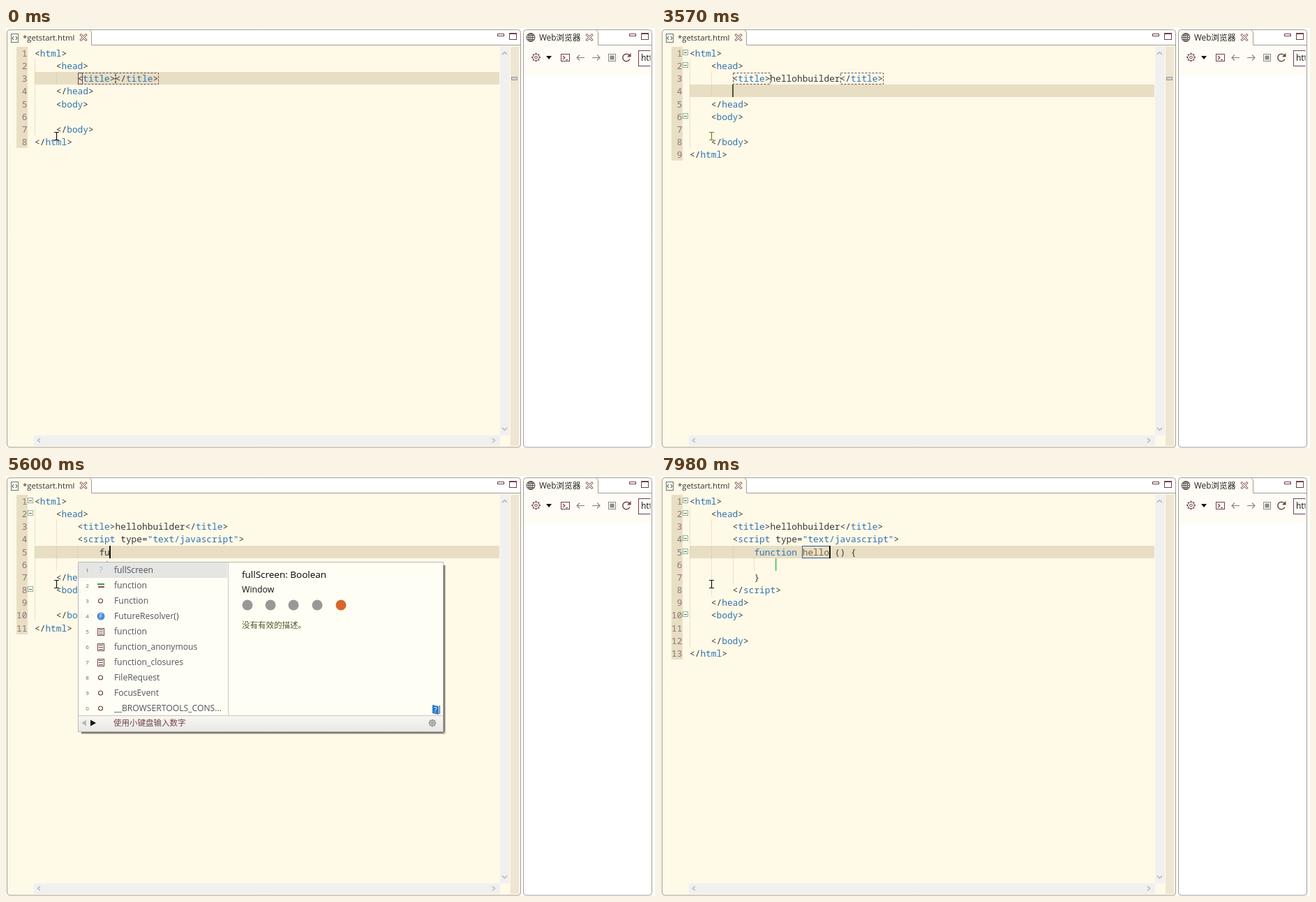
Write an HTML page with a canvas that moves like this. It is 930 px wide and 602 px high and loops after 8000 ms.

```html
<!DOCTYPE html>
<html lang="zh-CN">
<head>
<meta charset="utf-8">
<style>
html, body { margin: 0; width: 100%; height: 100%; overflow: hidden; background: #fff; }
canvas { display: block; }
</style>
</head>
<body>
<canvas width="930" height="602"></canvas>
<script>
const c = document.querySelector('canvas').getContext('2d');
const MONO = '12.83px "Noto Sans Mono", monospace';
const ui = size => `${size}px "Open Sans", "Noto Sans CJK SC", sans-serif`;
const CREAM = '#fff9e7', BAND = '#e8dec4', MAROON = '#6d4049', BLUE = '#2f74b3', DARK = '#33393a';
const LOOP = 8000, PITCH = 7.7, ROW = 18.15, BLINK = 490;

const colX = col => 41 + col * PITCH;
const rowY = row => Math.round(27 + row * ROW);

// drawing helpers
function fill(x, y, w, h, color) { c.fillStyle = color; c.fillRect(x, y, w, h); }
function box(x, y, w, h, color, dash = []) {
  c.strokeStyle = color; c.lineWidth = 1; c.setLineDash(dash);
  c.strokeRect(x + .5, y + .5, w, h);
  c.setLineDash([]);
}
function line(color, width, ...pts) {
  c.strokeStyle = color; c.lineWidth = width;
  c.beginPath();
  for (let i = 0; i < pts.length; i += 2) c.lineTo(pts[i], pts[i + 1]);
  c.stroke();
}
function poly(color, ...pts) {
  c.fillStyle = color;
  c.beginPath();
  for (let i = 0; i < pts.length; i += 2) c.lineTo(pts[i], pts[i + 1]);
  c.fill();
}
function disc(x, y, r, color) { c.fillStyle = color; c.beginPath(); c.arc(x, y, r, 0, 7); c.fill(); }
function ring(x, y, r, color, from = 0, to = 7, width = 1.2) {
  c.strokeStyle = color; c.lineWidth = width;
  c.beginPath(); c.arc(x, y, r, from, to); c.stroke();
}
function text(s, x, y, font, color, align = 'left') {
  c.font = font; c.fillStyle = color; c.textAlign = align;
  c.fillText(s, x, y);
}
function gear(x, y, r, color, width = 1) {
  ring(x, y, r * .72, color, 0, 7, width);
  ring(x, y, r * .28, color, 0, 7, width);
  for (let a = 0; a < 8; a++) {
    const dx = Math.cos(a * Math.PI / 4), dy = Math.sin(a * Math.PI / 4);
    line(color, 1.4, x + dx * r * .72, y + dy * r * .72, x + dx * r, y + dy * r);
  }
}
function closeIcon(x, y) {
  line(MAROON, 3, x - 4.5, y - 4.5, x + 4.5, y + 4.5);
  line(MAROON, 3, x - 4.5, y + 4.5, x + 4.5, y - 4.5);
  line('#fff', 1.5, x - 4, y - 4, x + 4, y + 4);
  line('#fff', 1.5, x - 4, y + 4, x + 4, y - 4);
}
function windowIcons(x) {
  box(x, 8, 9, 3, MAROON);
  box(x + 17, 7, 10, 9, MAROON);
  line(MAROON, 1, x + 17, 8.5, x + 28, 8.5);
}

// window frames
function panel(x, w, tabRight) {
  c.strokeStyle = '#a39c94'; c.lineWidth = 1;
  c.beginPath(); c.roundRect(x + .5, 2.5, w, 598.5, 4); c.stroke();
  line('#a39c94', 1, tabRight - 2, 3, tabRight + .5, 6, tabRight + .5, 24.5, x + w, 24.5);
}
function editorFrame(marker) {
  fill(2, 3, 120, 22, CREAM);
  fill(2, 25, 735, 576, CREAM);
  panel(1, 736, 122);
  box(7, 8, 10, 12, '#6c7478');
  line('#2f6075', 1.1, 11, 12, 9, 14.5, 11, 17);
  line('#2f6075', 1.1, 14, 12, 16, 14.5, 14, 17);
  text('*getstart.html', 24, 18, ui(11.3), '#333');
  closeIcon(111, 13.5);
  windowIcons(704);
  fill(708, 27, 14, 557, '#f0f0f0');
  fill(723, 27, 12, 572, '#eee6d3');
  fill(40, 584, 668, 15, '#f0f0f0');
  const grey = '#b5b5b5';
  line(grey, 1.5, 711, 38, 714.5, 34.5, 718, 38);
  line(grey, 1.5, 711, 573, 714.5, 576.5, 718, 573);
  line(grey, 1.5, 49, 588, 45.5, 591, 49, 594);
  line(grey, 1.5, 697, 588, 700.5, 591, 697, 594);
  if (marker) { fill(724, 70, 9, 5, '#d0d0ce'); box(724, 70, 8, 4, '#999'); }
}
function browserFrame() {
  fill(742, 25, 183, 43, '#fffcf5');
  fill(742, 3, 107, 22, '#fffcf5');
  panel(741, 184, 848);
  const ink = '#5c5558', grey = '#8d8888';
  ring(752, 13.5, 5.8, ink);
  c.beginPath(); c.ellipse(752, 13.5, 2.7, 5.8, 0, 0, 7); c.stroke();
  for (const dy of [-3, 0, 3]) line(ink, 1, 747, 13.5 + dy, 757, 13.5 + dy);
  line(ink, 1, 752, 8, 752, 19);
  text('Web浏览器', 764, 18, ui(11.7), '#222');
  closeIcon(836, 13.5);
  windowIcons(893);
  gear(759.5, 42, 6.5, MAROON);
  poly('#111', 774, 40, 782, 40, 778, 45);
  box(795, 37, 12, 10, MAROON);
  line(MAROON, 1.1, 798, 40, 801, 42.5, 798, 45);
  line(MAROON, 1.1, 802, 45.5, 805, 45.5);
  for (const [x, d] of [[823.5, -1], [845.5, 1]]) {
    line(grey, 1.2, x - 5.5 * d, 42.5, x + 5.5 * d, 42.5);
    line(grey, 1.2, x + 1.5 * d, 38.5, x + 5.5 * d, 42.5, x + 1.5 * d, 46.5);
  }
  box(863, 37, 10, 10, grey);
  fill(865.5, 39.5, 6, 6, grey);
  ring(889, 42.5, 5.2, MAROON, .4, 5.6, 1.4);
  poly(MAROON, 895.5, 36, 895.5, 41.5, 890, 41.5);
  c.save();
  c.beginPath(); c.rect(905, 30, 18.5, 28); c.clip();
  fill(906, 32, 30, 23, '#fff');
  box(906, 32, 30, 22, MAROON);
  text('http', 910, 47, ui(12), '#111');
  c.restore();
}

// the edited document over time
const titleKeys = [280, 420, 560, 700, 840, 1610, 1750, 1890, 2100, 2240, 2380, 2520, 2590];
const wordKeys = [5390, 5600, 5740, 5880];
const nameKeys = [7420, 7560, 7700, 7840, 7980];
const ENTER = 3570, S_KEY = 4060, SCRIPT = 5040, FUNC = 6370;
const caretKeys = [70, ...titleKeys, ENTER, S_KEY, 4270, SCRIPT, ...wordKeys, FUNC, 6790, ...nameKeys];
const typed = (word, keys, t) => word.slice(0, keys.filter(k => k <= t).length);
const indent = n => ' '.repeat(4 * n);

function documentAt(t) {
  const title = typed('hellohbuilder', titleKeys, t);
  const word = typed('func', wordKeys, t);
  const name = t < nameKeys[0] ? 'function_name' : typed('hello', nameKeys, t);
  const open = indent(2) + '<script type="text/javascript">', close = indent(2) + '<\/script>';
  let middle = [], row = 2, col = 15 + title.length;
  if (t >= FUNC) {
    middle = [open, `${indent(3)}function ${name} () {`, indent(4), indent(3) + '}', close];
    row = 4; col = 21 + name.length;
  } else if (t >= SCRIPT) {
    middle = [open, indent(3) + word, close];
    row = 4; col = 12 + word.length;
  } else if (t >= ENTER) {
    middle = [indent(2) + (t >= S_KEY ? 's' : '')];
    row = 3; col = middle[0].length;
  }
  const lines = ['<html>', '    <head>', `${indent(2)}<title>${title}</title>`, ...middle,
    '    </head>', '    <body>', '    ', '    </body>', '</html>'];
  return { lines, row, col, title, word, name };
}

function codeLine(s, row, t) {
  let before = '';
  for (const m of s.matchAll(/<\/?|>|"[^"]*"|\w+|[^\w\s<>"]+/g)) {
    const tok = m[0];
    let color = DARK;
    if (before[0] === '<' || tok[0] === '"' || tok === 'function') color = BLUE;
    else if (before === 'function') color = t < nameKeys[0] ? '#111' : '#80603f';
    text(tok, colX(m.index), rowY(row) + 14, MONO, color);
    before = tok;
  }
}

function editor(t, doc) {
  const { lines, row, col, title, name } = doc;
  fill(15, 27, 16, Math.round(lines.length * ROW), BAND);
  fill(41, rowY(row), 666, 18, BAND);
  lines.forEach((s, i) => {
    const y = rowY(i), depth = s.search(/\S|$/);
    for (let k = 0; k < depth; k += 4) {
      const x = Math.round(colX(k)) + .5;
      c.setLineDash([1, 1]);
      line('#cfc7b2', 1, x, y, x, y + 18);
      c.setLineDash([]);
    }
    text(i + 1, 30.5, y + 14, MONO, '#8b7672', 'right');
    const folds = t >= 6790 ? /<(html|head|body|script)|function/ : /<(html|head|body)/;
    if (t >= 70 && folds.test(s)) {
      fill(31, y + 4, 8, 8, '#fbfff4');
      box(31, y + 4, 7, 7, '#93b595');
      line('#46694d', 1, 33, y + 8.5, 37, y + 8.5);
    }
  });
  if (t >= FUNC) {
    const whole = t < nameKeys[0];
    const w = Math.round(name.length * PITCH);
    if (whole) fill(203, 100, w, 18, '#c2c276');
    box(202, 100, w, 17, whole ? '#485331' : '#2c62a5');
    fill(164, rowY(5), 1.3, 18, '#22b83c');
  }
  lines.forEach((s, i) => codeLine(s, i, t));
  if (t < S_KEY) {
    const end = 15 + title.length;
    for (const [a, b] of [[8, 15], [end, end + 8]])
      box(Math.round(colX(a)), 64, Math.round((b - a) * PITCH) - 1, 16, '#684c55', [3, 2]);
    if (t < 70) box(103, 64, 6, 16, '#684c55');
  }
  const last = caretKeys.filter(k => k <= t).pop();
  if (last !== undefined && Math.floor((t - last) / BLINK) % 2 === 0)
    fill(Math.floor(colX(col)), rowY(row), 2, 18, t >= ENTER && t < S_KEY ? '#4c5a2c' : '#111');
}

// completion popup
const icons = {
  snippet(x, y) {
    box(x - 5, y - 5, 9, 10, MAROON);
    for (const d of [-3, 0, 3]) line(MAROON, 1, x - 3, y + d + .5, x + 3, y + d + .5);
  },
  query(x, y) { text('?', x, y + 4, ui(12), '#8cc0e4', 'center'); },
  keyword(x, y) { fill(x - 5, y - 3, 10, 2, '#3e9a48'); fill(x - 4, y + 1, 9, 2, '#9c4250'); },
  type(x, y) { ring(x - .5, y, 3, MAROON); },
  method(x, y) { disc(x, y, 5.5, '#4a8bdc'); text('F', x, y + 3, ui(8.5), '#fff', 'center'); }
};
const scriptItems = ['script', 'script src', 'script_jquery_baidu', 'script_jquery_google',
  'select_option', 'span_id', 'style'].map(s => [s, 'snippet']);
const wordItems = [['fullScreen', 'query'], ['function', 'keyword'], ['Function', 'type'],
  ['FutureResolver()', 'method'], ['function', 'snippet'], ['function_anonymous', 'snippet'],
  ['function_closures', 'snippet'], ['FileRequest', 'type'], ['FocusEvent', 'type'],
  ['__BROWSERTOOLS_CONS...', 'type']];
const OLIVE = '#555329';

function popup(x, y, age, items, more, detail) {
  const fade = Math.min(1, (1 + Math.floor(age / 70)) / 3);
  c.save();
  c.translate(x, y);
  c.globalAlpha = fade;
  for (let i = 0; i < 3; i++) {
    const shade = `rgba(0,0,0,${.58 - .17 * i})`;
    fill(524 + i, 5, 1, 239 + i, shade);
    fill(5, 244 + i, 519 + i, 1, shade);
  }
  // the body lets a trace of the code show through
  c.globalAlpha = fade * .93;
  fill(0, 0, 524, 244, '#fffef6');
  c.globalAlpha = fade;
  const g = c.createLinearGradient(0, 221, 0, 243);
  g.addColorStop(0, '#f8f6f1'); g.addColorStop(1, '#e9e8e5');
  fill(1, 221, 522, 22, g);
  c.globalAlpha = fade * .93;
  fill(1, 1, 213, 22, '#e3e3e2');
  c.globalAlpha = fade;
  box(0, 0, 523, 243, '#b9b9b7');
  line('#c8c8c6', 1, 215.5, 1, 215.5, 221);
  line('#c8c8c6', 1, 1, 220.5, 523, 220.5);
  items.forEach(([label, icon], i) => {
    const cy = 12 + 22 * i;
    text((i + 1) % 10, 13.5, cy + 2.5, ui(8), '#666', 'center');
    icons[icon](33, cy);
    text(label, 52, cy + 4, ui(12.15), '#51535c');
  });
  poly('#b9b9b9', 5, 231, 12, 226.5, 12, 235.5);
  poly(more ? '#111' : '#b9b9b9', 26, 231, 18, 226.5, 18, 235.5);
  text('使用小键盘输入数字', 51, 235, ui(11.5), '#70434c');
  gear(508, 231, 5.5, '#999', 1.8);
  detail();
  c.restore();
}
function scriptDetail() {
  text('script', 235, 23, ui(13.5), '#000');
  text('触发字符：script', 235, 44, ui(11.6), '#111');
  text('来源：代码块', 235, 58, ui(11.6), '#111');
  ["<script type='text/javascript'>", '$0', '<\/script>'].forEach((s, i) =>
    text(s, 236, 88 + 15 * i, ui(12.2), OLIVE));
  box(505, 204, 14, 14, MAROON);
  box(506, 205, 12, 12, MAROON);
  line('#443a40', 2.6, 509.5, 215, 519, 205.5);
}
function wordDetail(full) {
  text(full ? 'fullScreen: Boolean' : 'function', 235, 23, ui(13.5), '#000');
  if (full) {
    text('Window', 235, 44, ui(12.3), '#111');
    [243, 276, 309, 343, 377].forEach((x, i) => disc(x, 62, 7.5, i < 4 ? '#999896' : '#d7662b'));
  }
  text('没有有效的描述。', 235, full ? 95 : 44, ui(11.5), OLIVE);
  poly('#2f7cc4', 508, 205, 517, 207, 517, 219, 508, 217);
  text('?', 512.5, 216, ui(10), '#fff', 'center');
  line('#1d4f8c', 1, 518.5, 206, 518.5, 218);
}

function mouse(t) {
  if (t >= 4130 && t < 5390) {
    const arrow = [72.5, 158.5, 72.5, 174, 76, 170.8, 78.6, 176.3, 81, 175.2, 78.5, 169.8, 83, 169.4, 72.5, 158.5];
    poly('#fff', ...arrow);
    line('#111', 1, ...arrow);
    return;
  }
  const color = t >= 70 && t < 4130 ? '#77782c' : '#111';
  line(color, 1.2, 72.5, 149, 72.5, 161);
  for (const y of [149.5, 160.5]) line(color, 1, 69, y, 76, y);
}

function draw(now) {
  const t = now % LOOP;
  fill(0, 0, 930, 602, '#fff');
  editorFrame(t < S_KEY);
  browserFrame();
  const doc = documentAt(t);
  editor(t, doc);
  if (t >= 4130 && t < SCRIPT) popup(72, 105, t - 4130, scriptItems, false, scriptDetail);
  if (t >= 5460 && t < FUNC) {
    const full = doc.word.length < 3;
    const items = full ? wordItems : wordItems.filter(([s]) => s.toLowerCase().startsWith(doc.word));
    popup(103, 123, t - 5460, items, full, () => wordDetail(full));
  }
  mouse(t);
}

const start = performance.now();
function tick() {
  draw(performance.now() - start);
  requestAnimationFrame(tick);
}
tick();
</script>
</body>
</html>
```
